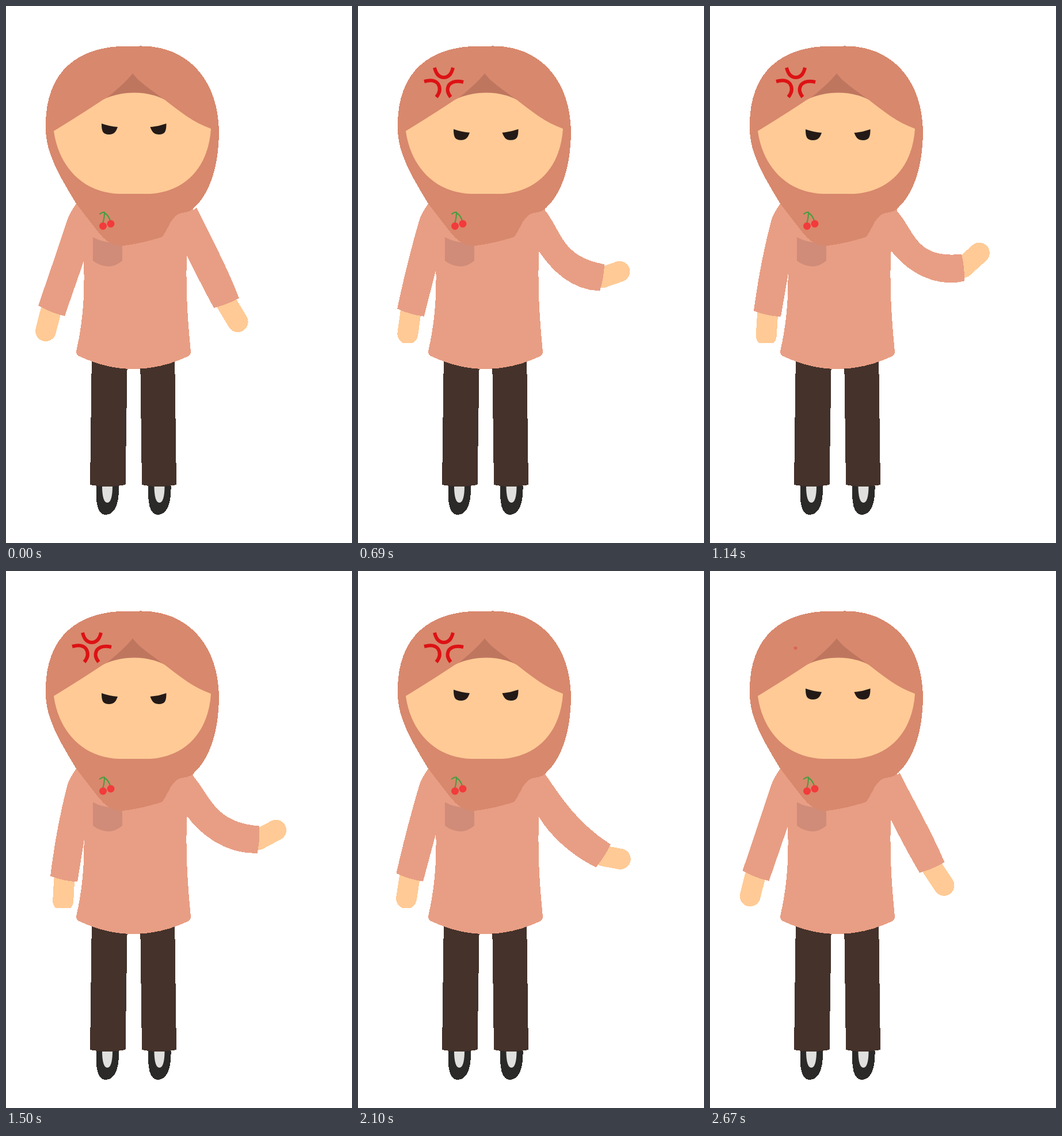
Recreate the animation shown at these times as an HTML page. Size 601 px wide and 932 px high, loop 2.7 s.

```html
<!DOCTYPE html>
<html lang="en">
<head>
<meta charset="utf-8">
<title>Angry character</title>
<style>
  html, body { margin: 0; width: 100%; height: 100%; overflow: hidden; background: #fff; }
  svg { display: block; width: 100%; height: 100%; }
  .hard { shape-rendering: crispEdges; }
  .shirt { fill: #e89e84; }
  .skin { fill: #ffca95; }
  .hand { fill: none; stroke: #ffca95; stroke-width: 36; stroke-linecap: round; }
  .scarf { fill: #d8886d; }
  .dark { fill: #44322b; }
  .shoe { fill: #2b2a28; }
  .tongue { fill: #e0e0de; }
  .eye { fill: #231a17; }
  .line { fill: none; }
</style>
</head>
<body>
<svg viewBox="0 0 601 932">
  <defs>
    <clipPath id="handClip"><rect width="601" height="585"/></clipPath>
    <g id="foot">
      <path class="shoe hard" d="M157 833 C155 865 160 883 173 883 C188 883 197 866 196 833 Z"/>
      <path class="tongue" d="M167 833 H185 C185 851 182 862 176 862 C170 862 167 851 167 833 Z"/>
    </g>
    <path id="eye" class="eye" d="M166 204 Q180 209 194 210 C191 218 188 223 179 223 C168 223 166 217 166 204 Z"/>
  </defs>

  <use href="#foot"/>
  <use href="#foot" x="90.5"/>
  <path class="dark hard" d="M149 600 H211 L207.500 831 Q177 837 146 831 Z M233 600 H293 L296 831 Q266 837 236 831 Z"/>

  <g class="hard">
    <path id="leftHand" class="hand" clip-path="url(#handClip)"/>
    <path id="leftSleeve" class="shirt"/>
    <path id="rightHand" class="hand"/>
    <path id="rightSleeve" class="shirt"/>
    <path class="shirt" d="M122 343 L135 440 C137 500 134 548 122 599 Q122 607 130 609 Q221 651 314 609 Q321 606 321 600 C316 548 312 500 314 430 L326 348 Z"/>
  </g>
  <path fill="#d08c78" d="M151 401 Q166 411 202 412 V442 Q190 452 178 452 Q162 451 151 442 Z"/>

  <path class="scarf hard" d="M210 69.500 H232 C312 68 368 124 370 217 C370 268 358 320 329 348 C317 362 307 356 298 362 C285 370 281 389 271 401 Q232 413 203 416 C184 417 172 407 160 392 Q141 368 122 343 C95 298 69 258 69 212 C67 114 124 70 210 69.500 Z"/>
  <path fill="#bf765f" d="M220 117 C232 133 252 145 278 165 Q221 150 168 165 Q204 137 220 117 Z"/>
  <path class="skin" d="M83 217 Q132 187 168 163 C198 147 246 146 276 163 C304 185 326 202 356 213 C352 276 315 322 250 326 H197 C130 324 91 275 83 217 Z"/>

  <path class="line" stroke="#4a9d3f" stroke-width="2.200" stroke-linecap="round"
    d="M163 361 Q167 357 171 358 Q171 369 168 377 M171 359 Q179 364 181 373"/>
  <g fill="#f23b3b">
    <circle cx="168.500" cy="382" r="6.500"/>
    <circle cx="182" cy="378" r="6.500"/>
  </g>

  <g id="eyes">
    <use href="#eye"/>
    <use href="#eye" transform="translate(444.500 0) scale(-1 1)"/>
  </g>
  <g id="mark" class="line" stroke="#dd1214" stroke-width="6">
    <path d="M133 107 Q137 124 149 124 Q161 124 165 107"/>
    <path d="M115 131 Q132 126 139 135 Q146 146 136 158"/>
    <path d="M183 132 Q166 128 158 137 Q152 147 161 158"/>
  </g>
</svg>
<script>
const LOOP = 2700, HALF = LOOP / 2, STEP = 30, PEAK = 1140;
const $ = id => document.getElementById(id);
const put = (id, name, value) => $(id).setAttribute(name, value);
const mix = (a, b, k) => a + (b - a) * k;
const str = p => p[0].toFixed(2) + ' ' + p[1].toFixed(2);

// Point at a distance from p in the direction of an angle in degrees.
function polar([x, y], angle, dist) {
  const a = angle * Math.PI / 180;
  return [x + dist * Math.cos(a), y + dist * Math.sin(a)];
}

// The arm rises with a bent elbow and swings back down wider and straighter.
function rightArm(t) {
  const rising = t < PEAK;
  const r = rising ? 1 - (1 - t / PEAK) ** 1.45
                   : 1 - ((t - PEAK) / (LOOP - PEAK)) ** 1.35;
  const arc = Math.sin(Math.PI * r), root = Math.sqrt(r);
  const [dx, dy, turn] = rising ? [-1, 2, -5] : [16, 8.5, 0];

  const cuff = [mix(383, 439.5, r) + dx * arc, mix(515.5, 454, r) + dy * arc];
  const angle = mix(69, -6, r) + turn * arc;
  const top = polar(cuff, angle - 90, 23.5), bottom = polar(cuff, angle + 90, 23.5);
  const shoulder = [331 - 9 * root, 350 + 3 * root];
  const armpit = [314, 433 - 9 * root];

  const upper = [polar(shoulder, mix(64, 46, r), 50), polar(top, angle, -mix(58, 83, r)), top];
  const lower = [polar(bottom, angle - 8, -mix(36, 54, r)), polar(armpit, mix(63, 54, r), mix(36, 42, r)), armpit];
  put('rightSleeve', 'd', `M${str(shoulder)} C${upper.map(str)} Q${str(polar(cuff, angle, 3))} ${str(bottom)} C${lower.map(str)} L290 380 Z`);

  const tip = polar(cuff, angle - mix(10, 36, r), 38 - 8 * arc);
  put('rightHand', 'd', `M${str(cuff)} L${str(tip)}`);
}

function leftArm(u) {
  const at = (x, y, dx, dy) => str([x + dx * u, y + dy * u]);
  put('leftSleeve', 'd', `M122 343 Q112 357 107 370 Q${at(82, 445, 6, 0)} ${at(56, 520, 23.7, 10.7)} ` +
    `Q${at(79, 533, 24, 6)} ${at(102, 538, 24.9, 1.5)} L${at(135, 443, 0, 32)} L145 400 Z`);
  put('leftHand', 'd', `M${at(78, 529, 26, 8)} L${at(69, 564, 34, 9.5)}`);
}

function draw(t) {
  rightArm(t);
  leftArm(1 - Math.abs(t / HALF - 1));

  const drop = t < HALF ? 1 - Math.exp(-t / 165) : ((LOOP - t) / HALF) ** 2;
  put('eyes', 'transform', `translate(0 ${(10 * drop).toFixed(2)})`);

  const size = Math.min(1, t / 300, (LOOP - t) / 300);
  put('mark', 'transform', `translate(148.5 134) scale(${size}) translate(-148.5 -134)`);
  put('mark', 'visibility', size ? 'visible' : 'hidden');
}

const start = performance.now();
function tick() {
  const t = (performance.now() - start) % LOOP;
  draw(Math.floor(t / STEP) * STEP);
  requestAnimationFrame(tick);
}
tick();
</script>
</body>
</html>
```
